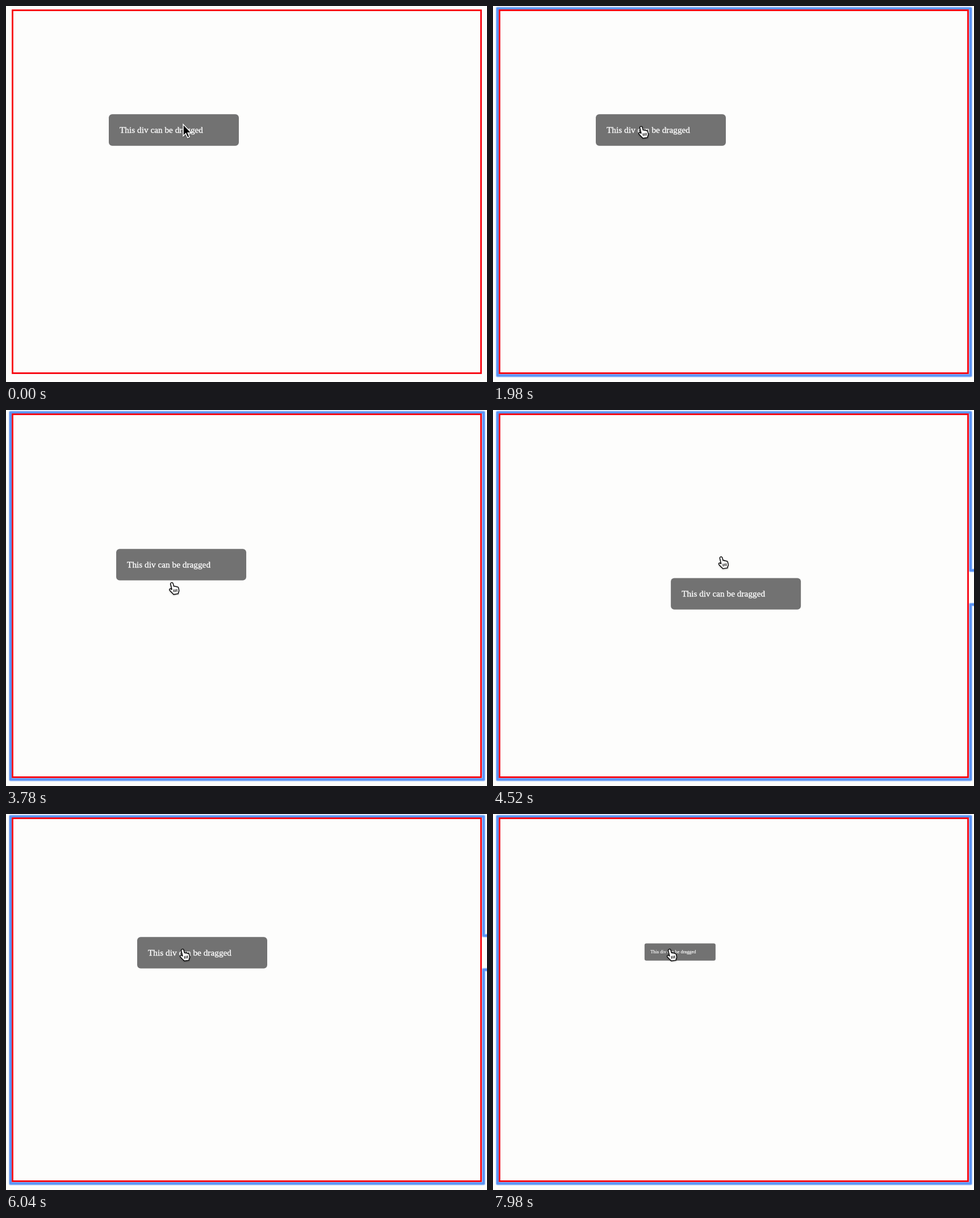
These frames come from a looping animation (847x661 px, 8000 ms). An HTML page:

```html
<!DOCTYPE html>
<html>
<head>
<meta charset="utf-8">
<style>
  html, body { margin: 0; width: 100%; height: 100%; overflow: hidden; background: #fdfdfc; }
  svg { display: block; }
  text { font: 15.3px "Liberation Serif", Times, serif; fill: #fff; stroke: #fff; stroke-width: .3px; }
  #arrow, #hand { filter: drop-shadow(0 1px 1px rgba(0, 0, 0, .35)); }
</style>
</head>
<body>
<svg width="847" height="661" viewBox="0 0 847 661">
  <g id="ring" fill="none" stroke="#5b94f6" stroke-linejoin="round">
    <path stroke-width="6.5" opacity=".45"/>
    <path stroke-width="4"/>
  </g>
  <rect x="11.5" y="7.5" width="825" height="638" fill="none" stroke="#f8000c" stroke-width="2.8"/>
  <g id="box">
    <rect width="229" height="55.4" rx="6" fill="#727272"/>
    <text x="19" y="32.5">This div can be dragged</text>
  </g>
  <g id="arrow">
    <path d="M0 0V20.5l4.6-4.4 3.2 7.3 3.4-1.5-3.1-7h6.2z" stroke="#fff" stroke-width="1.5"/>
  </g>
  <g id="hand">
    <path d="M5.2 1.2c1.4-.8 2.9.1 3.2 1.5l1.3 4.8c1-.7 2.2-.4 2.6.5 1-.7 2.3-.3 2.7.6 1.3-.5 2.6.2 2.9 1.6l.9 4.3c.3 1.6-.3 2.6-1 3.8l-.3 2.2-8.2 1.2-1.2-1.5c-1.8-1.2-3.6-3.4-5.6-5.7-.9-1.1-.2-2.9 1.3-2.7 1.1.2 1.8.8 2.6 1.7L4 3.3c-.2-.9.2-1.7 1.2-2.1z" fill="#fff" stroke="#000" stroke-width="1.4"/>
    <path d="M9.6 13.2l.5 4.6M12.3 12.8l.4 4.6M14.9 12.4l.4 4.6" stroke="#000" stroke-width="1.2"/>
  </g>
</svg>
<script>
const LOOP = 8000, FOCUS = 1100, LAG = 200, OUTLINE_LEAD = 58;
const GRAB = { x: 73.6, y: 20.4 }, PIVOT = { x: 79, y: 25 };
const OVERFLOW = 620, RIGHT = 838;

// One counterclockwise swing; the hand leads and the box repeats it LAG later
const swing = [
  { t: 3200, x: 181, y: 190.3 },
  { t: 3580, x: 194, y: 244 },
  { t: 3780, x: 212, y: 282 },
  { t: 4320, x: 313, y: 295.5 },
  { t: 4520, x: 322, y: 237 },
  { t: 4880, x: 201, y: 152.4 },
  { t: 5080, x: 183, y: 190 },
  { t: 5750, x: 231, y: 216.2 }
];

const clamp01 = u => Math.min(1, Math.max(0, u));
const smooth = u => u * u * (3 - 2 * u);

// Cubic spline through the swing, at rest at both ends
function swingAt(t) {
  const end = swing.length - 1;
  if (t <= swing[0].t) return swing[0];
  if (t >= swing[end].t) return swing[end];
  const i = swing.findIndex(p => p.t > t) - 1;
  const a = swing[i], b = swing[i + 1], dt = b.t - a.t, u = (t - a.t) / dt;
  const speed = (k, axis) => k === 0 || k === end ? 0
    : (swing[k + 1][axis] - swing[k - 1][axis]) / (swing[k + 1].t - swing[k - 1].t);
  const along = axis => a[axis] + (b[axis] - a[axis]) * smooth(u)
    + dt * u * (1 - u) * ((1 - u) * speed(i, axis) - u * speed(i + 1, axis));
  return { x: along("x"), y: along("y") };
}

// Zooms in a little, then shrinks around the hand
function scaleAt(t) {
  const u = clamp01((t - 6150) / 1830);
  return 1 + .35 * Math.sin(Math.PI * u) - .454 * u ** 4;
}

function boxAt(t) {
  const { x, y } = swingAt(t - LAG), s = scaleAt(t);
  return { x: x + PIVOT.x * (1 - s), y: y + PIVOT.y * (1 - s), s };
}

// The outline opens to the right where the box's contents overflow the frame
function ringPath({ x, y, s }) {
  if (x + OVERFLOW * s < RIGHT) return "M8 4.5H841V649.5H8Z";
  return `M860 ${y - 2.5}H841V4.5H8V649.5H841V${y + 55 * s + 2.5}H860`;
}

const [ring, box, arrow, hand] = ["ring", "box", "arrow", "hand"].map(id => document.getElementById(id));
const place = (el, x, y, s = 1) => el.setAttribute("transform", `translate(${x} ${y}) scale(${s})`);
const show = (el, on) => el.setAttribute("visibility", on ? "visible" : "hidden");

function draw(t) {
  const focused = t >= FOCUS, { x, y, s } = boxAt(t), lead = swingAt(t);
  const approach = smooth(clamp01((t - 250) / 650));
  place(box, x, y, s);
  place(arrow, 312 - 54 * approach, 208 + 3 * approach);
  place(hand, lead.x + GRAB.x, lead.y + GRAB.y);
  show(arrow, !focused);
  show(hand, focused);
  show(ring, focused);
  const outline = ringPath(boxAt(t + OUTLINE_LEAD));
  for (const path of ring.children) path.setAttribute("d", outline);
}

const start = performance.now();
function tick() {
  draw((performance.now() - start) % LOOP);
  requestAnimationFrame(tick);
}
tick();
</script>
</body>
</html>
```
